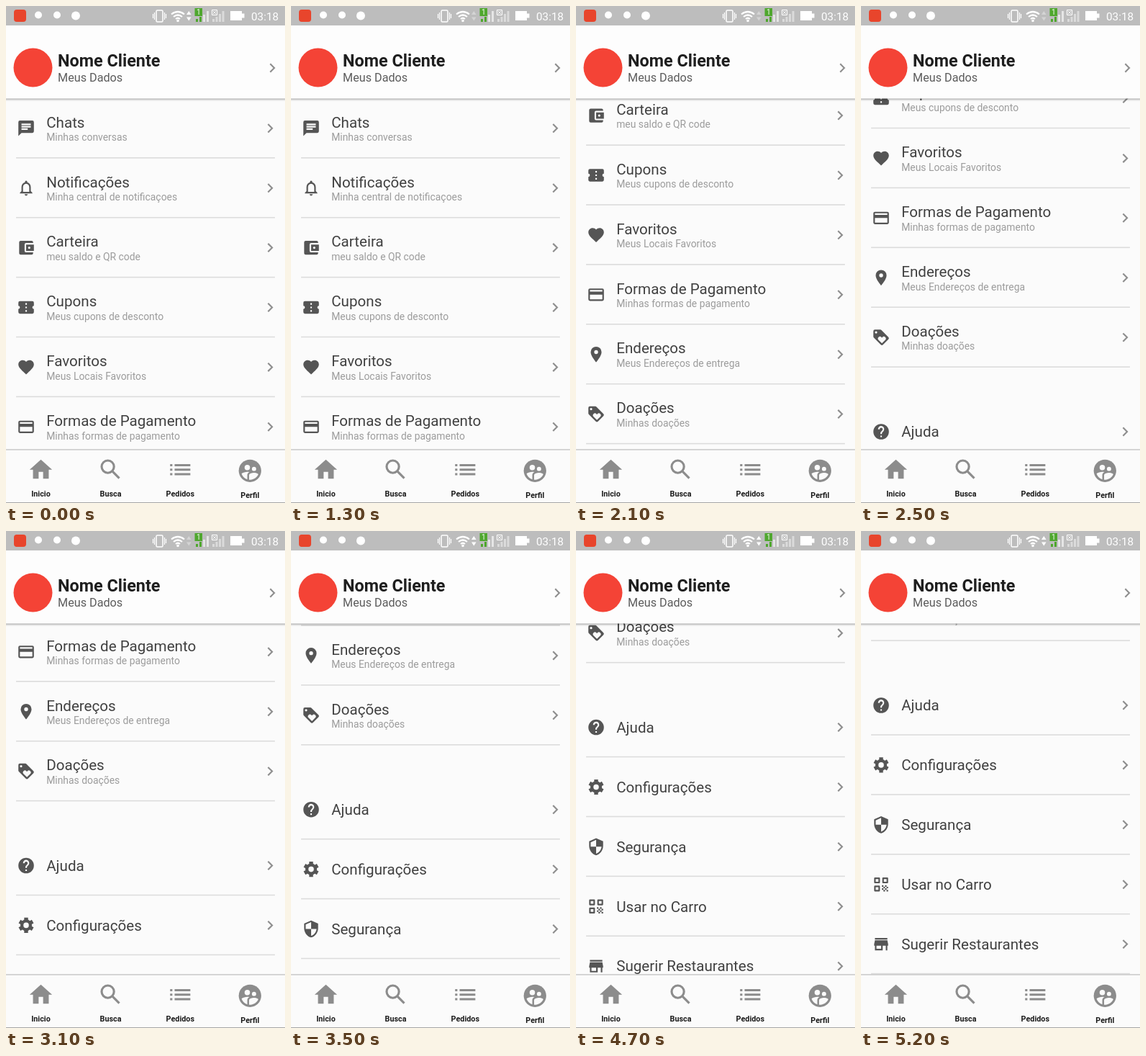
Recreate the animation shown at these times as an HTML page. Size 388 px wide and 690 px high, loop 5700 ms.

```html
<!DOCTYPE html>
<html lang="pt">
<head>
<meta charset="utf-8">
<title>Perfil</title>
<style>
  html, body { margin: 0; width: 100%; height: 100%; overflow: hidden; background: #fbfbfb; }
  svg { display: block; font-family: Roboto, sans-serif; }
  .title { font-size: 20.6px; fill: #414141; }
  .note { font-size: 13.9px; fill: #9c9c9c; }
  .label { font-size: 10.8px; font-weight: 700; fill: #1c1c1c; text-anchor: middle; }
  .header { fill: #fdfdfd; filter: drop-shadow(0 1.5px 1.5px rgba(0, 0, 0, .42)); }
</style>
</head>
<body>
<svg width="388" height="690" viewBox="0 0 388 690">
  <g id="list"></g>

  <rect class="header" x="-6" y="20" width="400" height="108.5"/>
  <circle cx="37.5" cy="85.5" r="27" fill="#f44336"/>
  <text x="72" y="84" font-size="23.4" font-weight="700" fill="#1e1e1e">Nome Cliente</text>
  <text x="72" y="104.7" font-size="16.2" fill="#5c5c5c">Meus Dados</text>
  <g id="headerArrow"></g>

  <rect width="388" height="27" fill="#bdbdbd"/>
  <g id="status" fill="#fff">
    <rect x="11" y="5" width="17" height="17" rx="4" fill="#e8452c"/>
    <circle cx="45" cy="12.5" r="5"/>
    <circle cx="71" cy="12.5" r="5"/>
    <circle cx="97" cy="13.5" r="6"/>
    <g fill="none" stroke="#fff" stroke-width="1.5">
      <rect x="209" y="6" width="9" height="16" rx="1.5"/>
      <path d="M206.500 9v10M220.500 9v10M204.500 11v6M222.500 11v6" stroke-width="1.2"/>
      <path d="M230 11.500q9-7 18 0M233 15q6-5 12 0M236 18q3-2.500 6 0" stroke-width="2.2"/>
    </g>
    <circle cx="239" cy="20.500" r="1.8"/>
    <path id="traffic" d="M251 12l3.300-5 3.300 5zM251 15.500h6.600l-3.300 5z"/>
    <path d="M274 12h3v10h-3zM279 7h3v15h-3z" opacity=".6"/>
    <path d="M264 18h3v4h-3zM269 15h3v7h-3z" fill="#4fa72e"/>
    <rect x="262.500" y="3" width="10.500" height="11" fill="#4fa72e"/>
    <text x="267.800" y="12" font-size="10" text-anchor="middle">1</text>
    <path d="M287 18h3v4h-3zM291.500 15h3v7h-3zM296 11h3v11h-3zM300.500 7h3v15h-3z" opacity=".45"/>
    <path d="M286.500 5.500h7v7h-7zM288 7l4 4M292 7l-4 4" fill="none" stroke="#fff"/>
    <path d="M312 7h16v3.500h3.500v6h-3.500v3.500h-16z"/>
    <text x="341" y="19.500" font-size="15.3">03:18</text>
  </g>

  <rect y="616" width="388" height="74" fill="#fbfbfb"/>
  <rect y="615.200" width="388" height="1.500" fill="#c9c9c9"/>
  <g id="nav"></g>
  <rect y="689" width="388" height="1" fill="#a5a5a5"/>
</svg>

<script>
// Icons live on a 24-unit grid.
const shape = d => `<path fill-rule="evenodd" d="${d}"/>`;
const ICONS = {
  chevron: shape('M10 6L8.600 7.400 13.200 12l-4.600 4.600L10 18l6-6z'),
  chat: shape('M20 2H4a2 2 0 0 0-2 2v18l4-4h14a2 2 0 0 0 2-2V4a2 2 0 0 0-2-2zM6 9h12v2H6zM6 12h8v2H6zM6 6h12v2H6z'),
  bell: shape('M10 20h4a2 2 0 0 1-4 0zM18 16v-5c0-3.100-1.600-5.600-4.500-6.300V4a1.500 1.500 0 0 0-3 0v.7C7.600 5.400 6 7.900 6 11v5l-2 2v1h16v-1zM16 17H8v-6c0-2.500 1.500-4.500 4-4.500s4 2 4 4.500z'),
  wallet: shape('M21 18v1a2 2 0 0 1-2 2H5a2 2 0 0 1-2-2V5a2 2 0 0 1 2-2h14a2 2 0 0 1 2 2v1h-9a2 2 0 0 0-2 2v8a2 2 0 0 0 2 2zM12 16h10V8H12zM16 10.500a1.500 1.500 0 0 1 0 3 1.500 1.500 0 0 1 0-3z'),
  ticket: shape('M22 10V6a2 2 0 0 0-2-2H4a2 2 0 0 0-2 2v4a2 2 0 0 1 0 4v4a2 2 0 0 0 2 2h16a2 2 0 0 0 2-2v-4a2 2 0 0 1 0-4zM11 15.500h2v2h-2zM11 11h2v2h-2zM11 6.500h2v2h-2z'),
  heart: shape('M12 21.300l-1.500-1.300C5.400 15.400 2 12.300 2 8.500 2 5.400 4.400 3 7.500 3c1.700 0 3.400.8 4.500 2.100C13.100 3.800 14.800 3 16.500 3 19.600 3 22 5.400 22 8.500c0 3.800-3.400 6.900-8.500 11.500z'),
  card: shape('M20 4H4a2 2 0 0 0-2 2v12a2 2 0 0 0 2 2h16a2 2 0 0 0 2-2V6a2 2 0 0 0-2-2zM4 18v-6h16v6zM4 8V6h16v2z'),
  pin: shape('M12 2a7 7 0 0 0-7 7c0 5.200 7 13 7 13s7-7.800 7-13a7 7 0 0 0-7-7zM12 6.500a2.500 2.500 0 0 1 0 5 2.500 2.500 0 0 1 0-5z'),
  tag: shape('M21.400 11.600l-9-9A2 2 0 0 0 11 2H4a2 2 0 0 0-2 2v7a2 2 0 0 0 .6 1.400l9 9a2 2 0 0 0 2.800 0l7-7a2 2 0 0 0 0-2.800zM5.500 4a1.500 1.500 0 0 1 0 3 1.500 1.500 0 0 1 0-3zM17.300 15.300L13 19.500l-4.300-4.200a2.500 2.500 0 0 1 3.600-3.600l.7.8.7-.8a2.500 2.500 0 0 1 3.600 3.600z'),
  help: shape('M12 2a10 10 0 0 0 0 20 10 10 0 0 0 0-20zM11 17h2v2h-2zM15.100 11.200l-.9 1C13.500 12.900 13 13.500 13 15h-2v-.5c0-1.100.4-2.100 1.200-2.800l1.200-1.300A2 2 0 1 0 10 9H8a4 4 0 1 1 7.100 2.200z'),
  gear: '<g fill="none" stroke="currentColor"><circle cx="12" cy="12" r="5.500" stroke-width="4"/>' +
    [0, 60, 120].map(a => `<path d="M12 2.200v4M12 17.800v4" stroke-width="5" transform="rotate(${a} 12 12)"/>`).join('') + '</g>',
  shield: shape('M12 1L3 5v6c0 5.500 3.800 10.700 9 12 5.200-1.300 9-6.500 9-12V5zM12 12h7c-.5 4.100-3.300 7.800-7 8.900V12H5V6.300l7-3.100z'),
  code: '<path d="M4 4h5.500v5.500H4zM14.500 4H20v5.500h-5.500zM4 14.500h5.500V20H4z" fill="none" stroke="currentColor" stroke-width="2" stroke-linejoin="round"/>' +
    shape('M13 13h2v2h-2zM15 15h2v2h-2zM17 13h2v2h-2zM13 17h2v2h-2zM15 19h2v2h-2zM17 17h2v2h-2zM19 15h2v2h-2zM19 19h2v2h-2z'),
  store: shape('M4 4h16v2H4zM21 14v-2l-1-5H4l-1 5v2h1v6h10v-6h4v6h2v-6zM6 18v-4h6v4z'),
  home: shape('M10 20v-6h4v6h5v-8h3L12 3 2 12h3v8z'),
  search: '<g fill="none" stroke="currentColor" stroke-width="2"><circle cx="9.500" cy="9.500" r="5.500"/><path d="M13.500 13.500l6.200 6.200"/></g>',
  list: shape('M3 7h2v2H3zM3 11h2v2H3zM3 15h2v2H3zM7 7h14v2H7zM7 11h14v2H7zM7 15h14v2H7z'),
  people: '<circle cx="12" cy="12" r="10"/><g fill="#fbfbfb"><circle cx="9.600" cy="9.100" r="2.400"/><circle cx="15.600" cy="10.300" r="1.900"/>' +
    shape('M9.600 15.900v3.700c-2.400-.7-4.300-2.600-5.100-5 1-1.100 3.600-1.700 5.100-1.700.5 0 1.200.1 1.900.2-1.600.9-1.900 2-1.900 2.800z') +
    shape('M11.200 20v-4.100c0-1.400 2.900-2.100 4.400-2.100 1.100 0 2.900.4 3.800 1.200-1.200 3-4.400 5.100-8.200 5z') + '</g>'
};

const ROWS = [
  ['chat', 'Chats', 'Minhas conversas'],
  ['bell', 'Notificações', 'Minha central de notificaçoes'],
  ['wallet', 'Carteira', 'meu saldo e QR code'],
  ['ticket', 'Cupons', 'Meus cupons de desconto'],
  ['heart', 'Favoritos', 'Meus Locais Favoritos'],
  ['card', 'Formas de Pagamento', 'Minhas formas de pagamento'],
  ['pin', 'Endereços', 'Meus Endereços de entrega'],
  ['tag', 'Doações', 'Minhas doações'],
  ['help', 'Ajuda'],
  ['gear', 'Configurações'],
  ['shield', 'Segurança'],
  ['code', 'Usar no Carro'],
  ['store', 'Sugerir Restaurantes']
];
const TABS = [
  ['home', 'Inicio', 48.5, 643.7],
  ['search', 'Busca', 145.5, 643.5],
  ['list', 'Pedidos', 242.3, 643.8],
  ['people', 'Perfil', 339.3, 645.3]
];

const LOOP = 5700, STEP = 100;
const ROW_HEIGHT = 82.9, FIRST_ROW = 169.8, GROUP_GAP = 48;
// [time in ms, scroll offset in px]
const SCROLL = [
  [0, 0], [1300, 0], [1800, 105], [2500, 290], [3100, 416.5], [3600, 500],
  [3700, 500], [4000, 568.5], [4200, 606], [4600, 606], [5200, 639], [LOOP, 639]
];

const byId = id => document.getElementById(id);

function icon(name, x, y, size, color) {
  const k = size / 24;
  return `<g transform="translate(${x - size / 2} ${y - size / 2}) scale(${k})" fill="${color}" color="${color}">${ICONS[name]}</g>`;
}

function row([name, title, note], index) {
  const y = FIRST_ROW + index * ROW_HEIGHT + (note ? 0 : GROUP_GAP);
  return icon(name, 28, y, 25.9, '#555') +
    `<text class="title" x="56.2" y="${y + (note ? -1.2 : 7.3)}">${title}</text>` +
    (note ? `<text class="note" x="56.2" y="${y + 17.3}">${note}</text>` : '') +
    icon('chevron', 367.3, y, 25.9, '#8e8e8e') +
    `<rect x="14" y="${y + 40.2}" width="360" height="1.6" fill="#dcdcdc"/>`;
}

function tab([name, label, x, y]) {
  return icon(name, x, y, 37.5, '#8c8c8c') +
    `<text class="label" x="${x}" y="${y + 37.3}">${label}</text>`;
}

byId('list').innerHTML = ROWS.map(row).join('');
byId('nav').innerHTML = TABS.map(tab).join('');
byId('headerArrow').innerHTML = icon('chevron', 370.3, 86, 25.9, '#8e8e8e');

function slope(i) {
  const [a, b] = [SCROLL[i], SCROLL[i + 1]];
  return a && b ? (b[1] - a[1]) / (b[0] - a[0]) : 0;
}

// Harmonic mean keeps the curve from overshooting its keys.
function tangent(i) {
  const a = slope(i - 1), b = slope(i);
  return a && b ? 2 * a * b / (a + b) : 0;
}

function scrollAt(t) {
  const i = SCROLL.findIndex(key => key[0] > t) - 1;
  const [t0, y0] = SCROLL[i], [t1, y1] = SCROLL[i + 1];
  const d = t1 - t0, u = (t - t0) / d, v = 1 - u;
  return y0 * v * v * (1 + 2 * u) + y1 * u * u * (3 - 2 * u) +
    d * u * v * (tangent(i) * v - tangent(i + 1) * u);
}

function draw() {
  const t = Math.floor(performance.now() % LOOP / STEP) * STEP;
  byId('list').setAttribute('transform', `translate(0 ${-scrollAt(t)})`);
  byId('traffic').setAttribute('opacity', t >= 500 && t < 3300 ? .35 : 1);
  requestAnimationFrame(draw);
}
draw();
</script>
</body>
</html>
```
